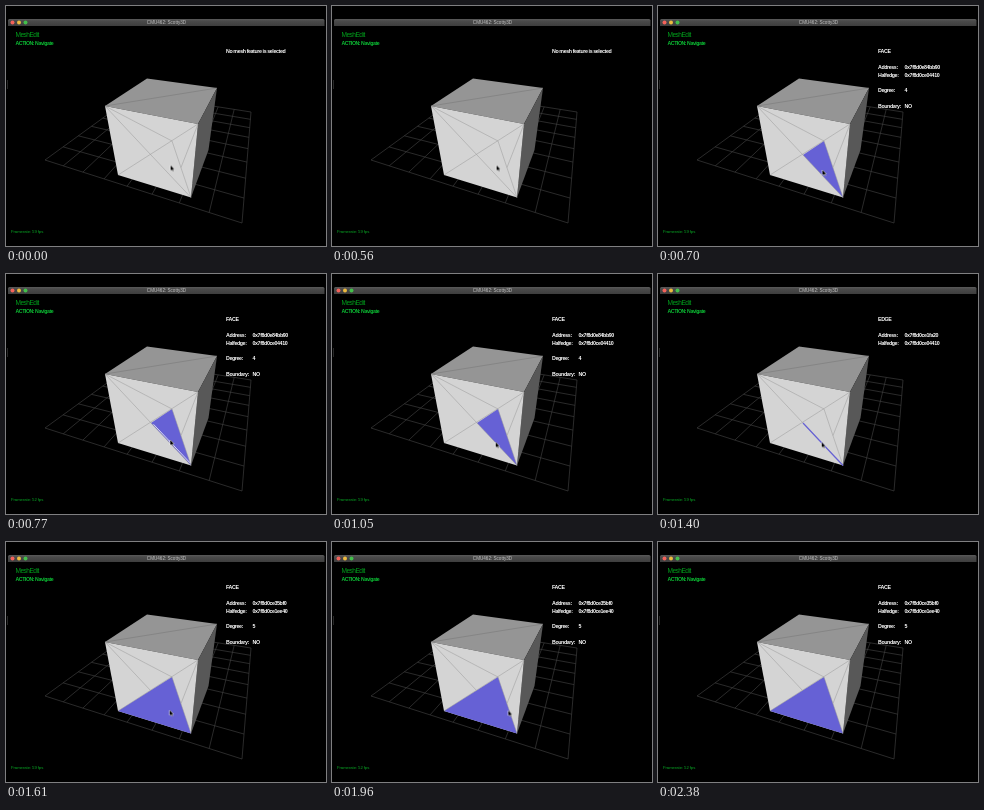
Write an HTML page that moves like this. It is 320 px wide and 240 px high and loops after 2940 ms.

```html
<!DOCTYPE html>
<html lang="en">
<head>
<meta charset="utf-8">
<title>Mesh editor</title>
<style>
  html, body { margin: 0; width: 100%; height: 100%; overflow: hidden; background: #000; }
  svg { display: block; width: 100vw; height: 100vh; }
  text { font: 4.6px "Liberation Sans", Arial, sans-serif; white-space: pre; }
  .info { font-size: 5.3px; font-weight: bold; letter-spacing: -.4px; fill: #fff; }
  .mode { font-size: 6.6px; letter-spacing: -.53px; fill: #00a01c; }
  .action { font-size: 5.2px; font-weight: bold; letter-spacing: -.43px; fill: #0cc034; }
  .rate { font-size: 4.3px; letter-spacing: -.1px; fill: #08a824; }
  .wire { fill: none; stroke: #989898; stroke-width: .5; }
  .grid { fill: none; stroke: #424242; stroke-width: .65; }
  .pick { fill: #6661d5; }

  .idle, .lights, .first, .line, .second, .hover, .edge, .slow, .fast, .cursor {
    animation: 2940ms step-end infinite;
  }
  .idle { animation-name: idle; }
  .lights { animation-name: lights; }
  .first { animation-name: first; }
  .line { animation-name: line; }
  .second { animation-name: second; }
  .hover { animation-name: hover; }
  .edge { animation-name: edge; }
  .fast { animation-name: fast; }
  .slow { animation-name: slow; }
  .cursor { animation-name: cursor; }

  @keyframes idle { 0% { opacity: 1 } 23.809%, 100% { opacity: 0 } }
  @keyframes lights { 0% { opacity: 1 } 19.047% { opacity: 0 } 21.428%, 100% { opacity: 1 } }
  @keyframes first { 0% { opacity: 0 } 23.809% { opacity: 1 } 47.619%, 100% { opacity: 0 } }
  @keyframes line { 0% { opacity: 0 } 47.619% { opacity: 1 } 54.761%, 100% { opacity: 0 } }
  @keyframes second { 0% { opacity: 0 } 54.761%, 100% { opacity: 1 } }
  @keyframes hover {
    0% { opacity: 0 } 26.19% { opacity: 1 } 30.952% { opacity: 0 }
    45.238% { opacity: 1 } 47.619%, 100% { opacity: 0 }
  }
  @keyframes edge { 0% { opacity: 1 } 54.761%, 100% { opacity: 0 } }
  @keyframes fast {
    0% { opacity: 1 } 26.19% { opacity: 0 } 30.952% { opacity: 1 } 66.666%, 100% { opacity: 0 }
  }
  @keyframes slow {
    0% { opacity: 0 } 26.19% { opacity: 1 } 30.952% { opacity: 0 } 66.666%, 100% { opacity: 1 }
  }
  @keyframes cursor {
    0% { transform: translate(164.6px, 159.4px); opacity: 1 }
    21.428% { transform: translate(164.6px, 161.5px) }
    23.809% { transform: translate(164.5px, 164px) }
    26.19% { transform: translate(164.3px, 166px) }
    30.952% { transform: translate(163.7px, 168.3px) }
    59.523% { transform: translate(166px, 168.4px) }
    61.904% { transform: translate(169.5px, 168.5px) }
    64.285% { transform: translate(173px, 168.6px) }
    66.666% { transform: translate(176.4px, 168.6px) }
    69.047% { transform: translate(181px, 162px) }
    71.428% { transform: translate(186px, 153px) }
    73.809% { transform: translate(192px, 143px) }
    76.19% { transform: translate(198px, 134px) }
    78.571% { transform: translate(245px, 47px); opacity: 1 }
    80.952%, 100% { transform: translate(245px, 47px); opacity: 0 }
  }
</style>
</head>
<body>
<svg viewBox="0 0 320 240" preserveAspectRatio="none">
  <defs>
    <linearGradient id="bar" x2="0" y2="1">
      <stop stop-color="#5a5a5a"/>
      <stop offset=".3" stop-color="#4a4a4a"/>
      <stop offset="1" stop-color="#3e3e3e"/>
    </linearGradient>
  </defs>
  <rect width="320" height="240"/>

  <!-- window bar -->
  <path d="M2 20V14.500Q2 13 3.500 13H317Q318.500 13 318.500 14.500V20Z" fill="url(#bar)"/>
  <g class="lights">
    <circle cx="6.500" cy="16.500" r="2" fill="#f4625a"/>
    <circle cx="13" cy="16.500" r="2" fill="#eebb3f"/>
    <circle cx="19.500" cy="16.500" r="2" fill="#43bf4b"/>
  </g>
  <text x="160.500" y="18.200" text-anchor="middle" fill="#c4c4c4">CMU462: Scotty3D</text>
  <path d="M1.500 74V83" stroke="#333" stroke-width=".8"/>

  <path id="grid" class="grid"/>

  <!-- cube -->
  <path d="M99 100L141 72.500L211 82L192 118Z" fill="#959595"/>
  <path d="M192 118L211 82L202.500 144L185 191.500Z" fill="#585858"/>
  <path d="M99 100L192 118L185 191.500L112 169Z" fill="#d4d4d4"/>
  <path d="M99 100L211 82" class="wire" style="stroke:#757575"/>
  <path class="pick first" d="M145 149L166 135L185 191.500Z"/>
  <path class="pick second" d="M112 169L166 135L185 191.500Z"/>
  <path class="wire" d="M112 169L192 118L175 161.500M99 100L166 135L185 191.500M99 100L145 149"/>
  <path class="wire edge" d="M145 149L185 191.500"/>
  <path class="hover" d="M147.500 150.300L184 188.800" stroke="#e4e4f4" stroke-width=".9"/>
  <path class="line" d="M145 149L185 191.500" stroke="#6661d5" stroke-width="1.200"/>

  <!-- overlay text -->
  <text class="mode" x="9.500" y="31.200">MeshEdit</text>
  <text class="action" x="9.500" y="39">ACTION: Navigate</text>
  <text class="rate fast" x="5" y="227.200">Framerate: 59 fps</text>
  <text class="rate slow" x="5" y="227.200">Framerate: 52 fps</text>
  <text class="info idle" x="220" y="46.700">No mesh feature is selected</text>
  <g id="first" class="first"></g>
  <g id="line" class="line"></g>
  <g id="second" class="second"></g>

  <path class="cursor" d="M0 0V5L1.200 4L2 5.800L2.900 5.400L2.100 3.700H3.600Z"
        fill="#000" stroke="#fff" stroke-width=".9" paint-order="stroke"/>
</svg>
<script>
  // Perspective floor: blend the corners by their projective weights.
  const corners = [[39, 154, 1], [236, 217, .714], [245, 106, 1.449], [130, 88, 1.735]];
  const cells = 8;

  function project(u, v) {
    const share = [(1 - u) * (1 - v), u * (1 - v), u * v, (1 - u) * v];
    let x = 0, y = 0, w = 0;
    corners.forEach(([cx, cy, cw], i) => {
      const k = share[i] * cw;
      x += cx * k;
      y += cy * k;
      w += k;
    });
    return (x / w).toFixed(2) + ' ' + (y / w).toFixed(2);
  }

  let path = '';
  for (let i = 0; i <= cells; i++) {
    const s = i / cells;
    path += `M${project(s, 0)}L${project(s, 1)}M${project(0, s)}L${project(1, s)}`;
  }
  document.getElementById('grid').setAttribute('d', path);

  function showInfo(id, title, rows) {
    document.getElementById(id).innerHTML = [[0, title, ''], ...rows].map(([line, label, value]) => {
      const y = 46.7 + line * 7.95;
      return `<text class="info" x="220" y="${y}">${label}</text>` +
             `<text class="info" x="246.5" y="${y}">${value}</text>`;
    }).join('');
  }

  function showFace(id, address, halfedge, degree) {
    showInfo(id, 'FACE', [[2, 'Address:', address], [3, 'Halfedge:', halfedge],
                          [5, 'Degree:', degree], [7, 'Boundary:', 'NO']]);
  }

  showFace('first', '0x7f8d0e84bb90', '0x7f8d0ce04410', 4);
  showInfo('line', 'EDGE', [[2, 'Address:', '0x7f8d0ce1fa20'], [3, 'Halfedge:', '0x7f8d0ce04410']]);
  showFace('second', '0x7f8d0ce35bf0', '0x7f8d0ce1ee40', 5);
</script>
</body>
</html>
```
